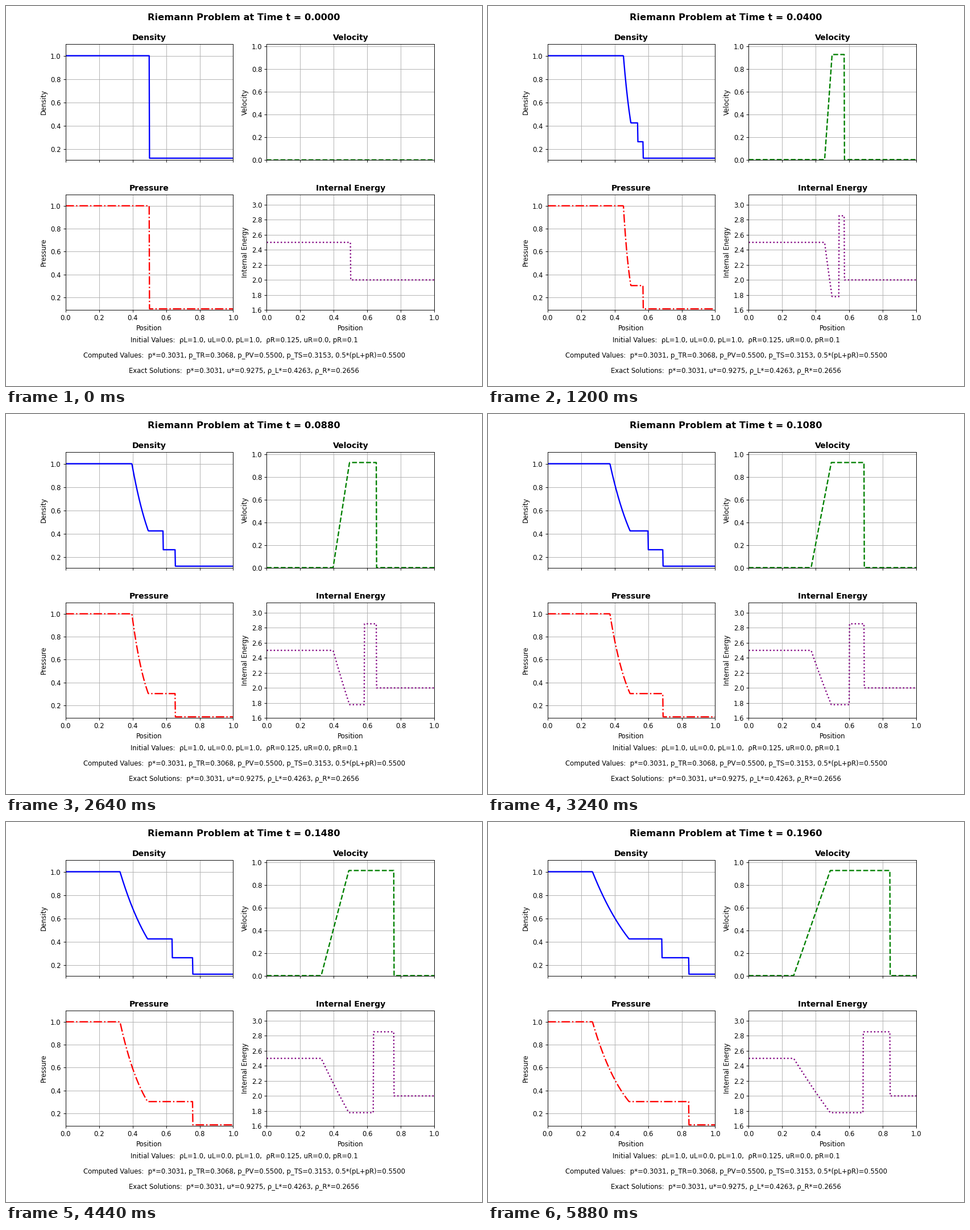
These frames come from a looping animation (837 by 669 pixels, 6000 ms). A matplotlib script:

```python
import numpy as np
import matplotlib.pyplot as plt
from matplotlib.animation import FuncAnimation
from matplotlib.ticker import MultipleLocator

WIDTH, HEIGHT, DPI = 837, 669, 83.7
FRAMES, INTERVAL, DT = 50, 120, 0.004

# Shock tube: left and right states, star region between the waves
GAMMA = 1.4
RHO_L, U_L, P_L = 1.0, 0.0, 1.0
RHO_R, U_R, P_R = 0.125, 0.0, 0.1
P_STAR, U_STAR = 0.30313, 0.92745
RHO_L_STAR, RHO_R_STAR = 0.42632, 0.26557

A_L = np.sqrt(GAMMA * P_L / RHO_L)
HEAD = U_L - A_L
TAIL = U_STAR - np.sqrt(GAMMA * P_STAR / RHO_L_STAR)
SHOCK = RHO_R_STAR * U_STAR / (RHO_R_STAR - RHO_R)

x = np.linspace(0, 1, 500)


def energy(rho, p):
    return p / ((GAMMA - 1) * rho)


def solve(t):
    """Density, velocity, pressure and internal energy along x at time t."""
    s = (x - 0.5) / max(t, 1e-12)
    fan_s = np.clip(s, HEAD, TAIL)
    fan = 2 / (GAMMA + 1) - (GAMMA - 1) / (GAMMA + 1) * fan_s / A_L
    regions = [s <= HEAD, s <= TAIL, s <= U_STAR, s <= SHOCK]

    def pick(left, in_fan, left_star, right_star, right):
        return np.select(regions, [left, in_fan, left_star, right_star], right)

    rho = pick(RHO_L, RHO_L * fan ** (2 / (GAMMA - 1)),
               RHO_L_STAR, RHO_R_STAR, RHO_R)
    u = pick(U_L, 2 / (GAMMA + 1) * (A_L + fan_s), U_STAR, U_STAR, U_R)
    p = pick(P_L, P_L * fan ** (2 * GAMMA / (GAMMA - 1)),
             P_STAR, P_STAR, P_R)
    return rho, u, p, energy(rho, p)


plt.rcParams["font.family"] = "DejaVu Sans"
# The tiny offset keeps the pixel size from rounding down
fig, axes = plt.subplots(
    2, 2, sharex=True, dpi=DPI,
    figsize=(WIDTH / DPI + 1e-9, HEIGHT / DPI + 1e-9))
fig.subplots_adjust(left=0.125, right=0.9, top=0.9, bottom=0.2,
                    wspace=0.2, hspace=0.3)
title = fig.suptitle("", fontsize=14, fontweight="bold")

panels = [
    ("Density", "blue", "-", RHO_R, RHO_L),
    ("Velocity", "green", "--", U_L, U_STAR),
    ("Pressure", "red", "-.", P_R, P_L),
    ("Internal Energy", "purple", ":",
     energy(RHO_L_STAR, P_STAR), energy(RHO_R_STAR, P_STAR)),
]
lines = []
for ax, (name, color, style, low, high) in zip(axes.flat, panels):
    lines += ax.plot([], [], color=color, linestyle=style, linewidth=2)
    ax.set_title(name, fontsize=12, fontweight="bold")
    ax.set_ylabel(name)
    ax.set_xlim(0, 1)
    ax.set_ylim(0.9 * low, 1.1 * high)
    ax.yaxis.set_major_locator(MultipleLocator(0.2))
    ax.grid(True)
for ax in axes[1]:
    ax.set_xlabel("Position")

notes = [
    "Initial Values:  ρL=1.0, uL=0.0, pL=1.0,  ρR=0.125, uR=0.0, pR=0.1",
    "Computed Values:  p*=0.3031, p_TR=0.3068, p_PV=0.5500, "
    "p_TS=0.3153, 0.5*(pL+pR)=0.5500",
    "Exact Solutions:  p*=0.3031, u*=0.9275, ρ_L*=0.4263, ρ_R*=0.2656",
]
for y, note in zip((0.12, 0.08, 0.04), notes):
    fig.text(0.5, y, note, ha="center", va="center", fontsize=10)


def update(frame):
    t = frame * DT
    title.set_text(f"Riemann Problem at Time t = {t:.4f}")
    for line, values in zip(lines, solve(t)):
        line.set_data(x, values)
    return [title, *lines]


animation = FuncAnimation(fig, update, frames=FRAMES, interval=INTERVAL,
                          repeat=True, repeat_delay=0)
plt.show()
```
